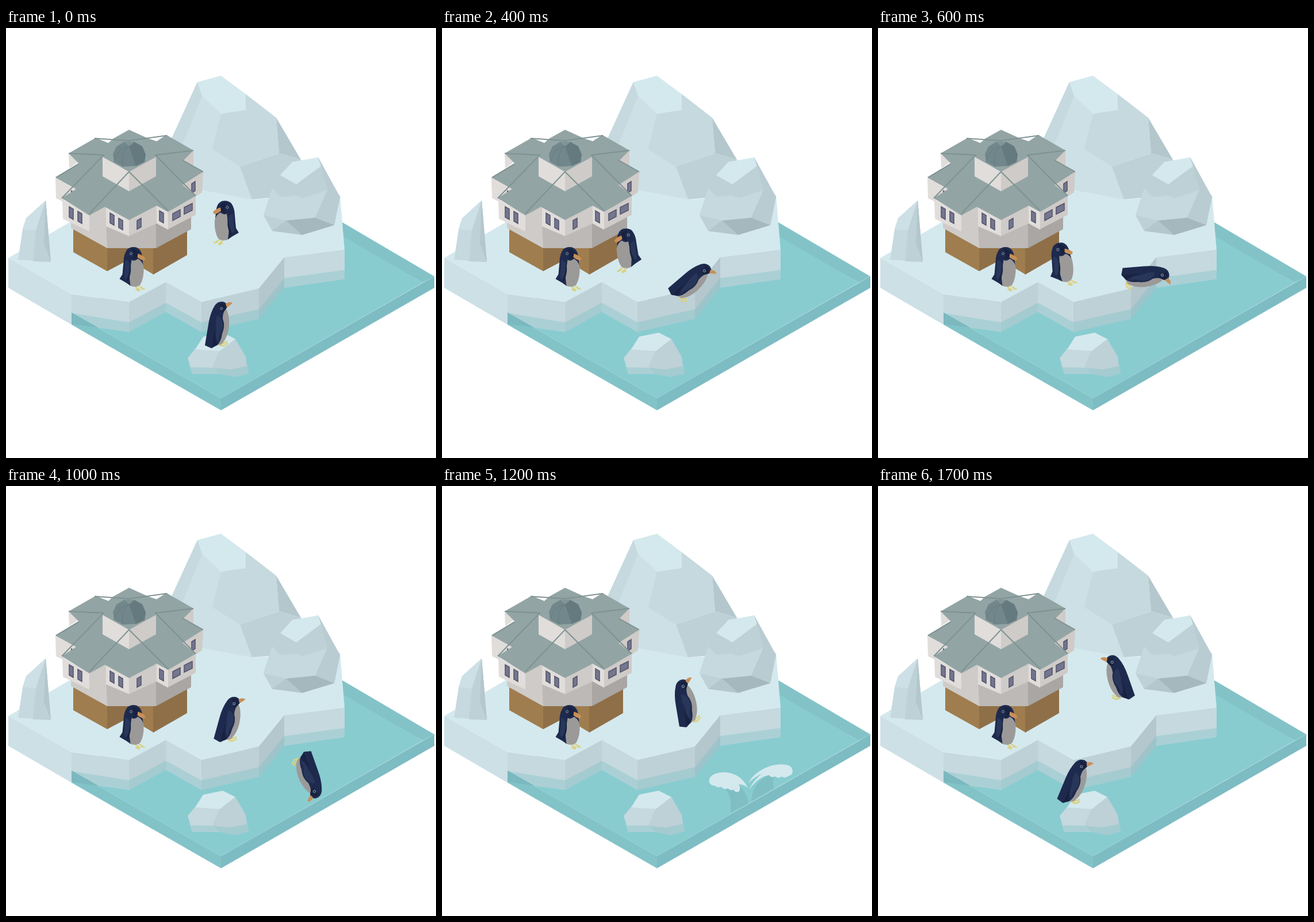
Animation, 748 px wide and 748 px high, one loop 1900 ms. Source, as an HTML page:

```html
<!DOCTYPE html>
<html lang="en">
<head>
<meta charset="utf-8">
<title>Polar island</title>
<style>
  html, body { margin: 0; width: 100%; height: 100%; overflow: hidden; background: #fff; }
  svg { display: block; width: 100vw; height: 100vh; }
  .ice1 { fill: #d4e9ee } .ice2 { fill: #cce0e6 } .ice3 { fill: #c5d9df }
  .ice4 { fill: #bed1d7 } .ice5 { fill: #b3c7cc } .ice6 { fill: #a5b8be }
  .wet1 { fill: #aad0d5 } .wet2 { fill: #a4cbd0 } .wet3 { fill: #9dc4ca }
  .wall { fill: #e0dddb } .shade { fill: #cfcbc8 } .roof { fill: #93a4a4 }
  .wood { fill: #9f7d4e } .dark { fill: #8f6f47 }
  .glass { fill: #74768f; stroke: #56576e; stroke-width: 1.6 }
  .seam { fill: none; stroke: #7f9292; stroke-width: 2 }
  .navy { fill: #1e2a4d } .wing { fill: #28365a } .deep { fill: #182240 }
  .belly { fill: #9b9a99 } .beak { fill: #c98f58 } .foot { fill: none; stroke: #d9d184; stroke-width: 2.6 }
  .eye { fill: #1e2a4d; stroke: #8795a0 }
</style>
</head>
<body>
<svg viewBox="0 0 748 748">
  <defs>
    <g id="front">
      <path class="foot" d="M4 29L14 37M10 28L21 35M6 35L13 38M15 33L22 35"/>
      <path class="navy" d="M-9-34Q-3-40 7-38Q15-35 17-25L19-8L13 26L-3 29L-10 24L-22 17L-17 9L-15-13Q-15-25-9-34Z"/>
      <path class="belly" d="M-1-16Q4-13 10-18Q17-15 20-5Q21 15 14 27Q7 33-3 29L-5 12Z"/>
      <path class="wing" d="M-12-16Q-5-15-4-7Q-2 5-9 19L-14 15Z"/>
      <path class="deep" d="M-4-12Q1 4-8 22L-10 18Q-3 5-4-12ZM-2-36Q9-36 12-27L8-19L0-17Q6-26-2-36Z"/>
      <path class="beak" d="M10-27Q19-24 23-19L21-15Q14-16 9-21Z"/>
      <circle class="eye" cx="-2" cy="-27" r="2"/>
    </g>
    <g id="side">
      <path class="foot" d="M4 35L16 29M2 36L10 37L17 32"/>
      <path class="belly" d="M13-29Q20-18 19-1Q18 22 6 34L-2 36L-1-10Z"/>
      <path class="navy" d="M-6-33Q-1-41 8-40Q16-38 16-31L11-24Q8-19 8-10Q13 2 7 16Q5 30-2 36L-12 41L-23 36L-17 0Q-14-20-6-33Z"/>
      <path class="wing" d="M-2-16Q7-13 8-1Q9 7 3 16Q0 23 1 31Q-6 24-3 9Q-6-3-2-16Z"/>
      <path class="deep" d="M0-36Q11-39 16-31L11-24L4-21Q8-30 0-36ZM-6 9Q-5 25-2 34L-11 41Z"/>
      <path class="beak" d="M13-36Q18-41 25-38Q22-34 15-30Z"/>
      <circle class="eye" cx="6" cy="-28" r="2"/>
    </g>
    <g id="plumes">
      <path fill="#7fbfc4" d="M480 514C501 529 504 546 502 569L533 552C531 536 525 526 512 520ZM538 549C539 524 552 509 575 500L581 503C571 517 578 522 578 526Z"/>
      <path class="ice1" d="M532 525C520 499 491 493 472 502C461 508 463 521 474 521Q479 526 485 523Q491 529 497 526Q503 531 507 528Q511 535 517 531Q520 525 516 519Q524 518 532 525ZM533 517C544 494 579 479 603 486C612 490 612 503 603 504Q596 510 591 505Q585 510 580 505Q574 509 569 503Q553 504 534 528Q542 512 557 500Q543 506 533 517Z"/>
    </g>
  </defs>

  <!-- water -->
  <path fill="#83c3c8" d="M585 338L745 432L725 443L580 361Z"/>
  <path fill="#88ccd0" d="M587 363L725 443L374 644L114 495L300 400Z"/>
  <path fill="#7dbcc3" d="M745 432V452L374 665V644Z"/>

  <!-- mountain -->
  <path class="ice2" d="M333 94L374 149L410 240L428 298L340 310L270 232Z"/>
  <path class="ice3" d="M333 94L341 118L306 205L289 190ZM374 149L417 141V115L470 156L475 218L407 241L359 211Z"/>
  <path class="ice5" d="M470 156L513 229L475 218Z"/>

  <!-- island -->
  <path class="ice1" d="M4 400L114 336L330 280L428 298L581 290L589 386L484 400L440 454L340 477L278 443L214 477L114 463Z"/>
  <path class="ice4" d="M407 241L475 218L513 229L530 290L428 298Z"/>
  <path class="ice2" d="M4 400L114 463V516L4 452Z"/>
  <path class="wet1" d="M114 495L214 511V529L114 515ZM278 477L340 511V529L278 494ZM484 434L589 420V437L484 452Z"/>
  <path class="wet2" d="M214 511L278 477V494L214 529ZM340 511L440 488V506L340 529Z"/>
  <path class="wet3" d="M440 488L484 434V452L440 506Z"/>
  <path class="ice3" d="M114 463L214 477V512L114 496ZM278 442L340 477V512L278 478ZM484 399L589 386V421L484 435Z"/>
  <path class="ice4" d="M214 477L278 442V478L214 512ZM340 477L440 453V489L340 512Z"/>
  <path class="ice5" d="M440 453L484 399V435L440 489Z"/>
  <path fill="#82c3c8" d="M114 495L374 644V665L114 516Z"/>
  <path fill="#7bb8bf" d="M114 495L160 521L114 515Z"/>

  <!-- peak, boulder, spire and floe -->
  <path class="ice1" d="M333 94L374 83L417 115V143L374 149L341 118Z"/>
  <path class="ice4" d="M477 256L543 225L581 294L571 343L515 360L463 353L448 326L463 279Z"/>
  <path class="ice3" d="M463 279L477 294L505 291L516 296L559 282L538 330L487 335L448 326Z"/>
  <path class="ice1" d="M477 256L498 233L543 225L548 240L505 272Z"/>
  <path fill="#b9ccd2" d="M543 225L581 294L571 343L538 330L559 282L548 240Z"/>
  <path class="ice6" d="M487 335L538 330L571 343L515 360Z"/>
  <path class="ice5" d="M463 353L487 335L515 360Z"/>
  <path class="ice3" d="M69 300L78 407L21 403L29 350L35 331Z"/>
  <path class="ice2" d="M69 300L52 352L29 350L35 331Z"/>
  <path class="ice4" d="M69 300L78 407L47 406L52 352Z"/>
  <path class="ice5" d="M69 300L78 407L66 375Z"/>
  <path class="wet1" d="M319 587L420 586L422 601L398 607L372 602L324 602Z"/>
  <path class="wet2" d="M359 590L420 586L422 601L398 607L372 602Z"/>
  <path class="ice3" d="M330 557L372 562L359 591L321 590L316 574Z"/>
  <path class="ice4" d="M399 541L417 572L419 588L390 594L359 591L372 562Z"/>
  <path class="ice1" d="M343 537L377 530L399 541L372 562L329 559Z"/>

  <!-- station -->
  <path class="wood" d="M117 348L176 381V423L117 390ZM214 381H257V429L214 403Z"/>
  <path class="dark" d="M176 381H214V403L176 423ZM256 381L315 348V395L256 429Z"/>
  <path class="shade" d="M113 325L176 335V383L113 348Z"/>
  <path fill="#bcb9b7" d="M174 335H261V383H176Z"/>
  <path fill="#a9a6a4" d="M261 335L322 322V350L261 383Z"/>
  <path class="wall" d="M109 218L130 230L110 244ZM86 260L125 280L99 302L87 296ZM98 298L145 325V354L99 332ZM172 309L214 333V362L174 345ZM262 308L282 320V351L262 340Z"/>
  <path class="shade" d="M326 213V240L308 230ZM343 250L341 286L330 293L300 270ZM145 325L174 309V345L145 354ZM214 333L262 308V340L214 362ZM282 320L330 292V325L282 350Z"/>
  <path class="glass" d="M110 311L117 315V333L110 329ZM125 319L132 323V340L125 336ZM181 322L188 326V343L181 339ZM196 331L203 335V351L196 347ZM267 318L274 322V339L267 335ZM228 335L235 331V346L228 350ZM290 323L303 316V328L290 335ZM310 312L324 305V317L310 324ZM323 271L329 267V283L323 287Z"/>
  <path fill="#56576e" d="M113 282L118 285L113 290Z"/>
  <path class="roof" d="M156 191L178 200L187 192L214 177L247 192L262 197L279 186L326 213L309 230L343 250L307 273L330 292L282 320L262 309L214 334L172 311L145 326L97 296L122 280L86 260L126 235L109 218Z"/>
  <path class="wall" d="M168 224L214 250V284L168 258Z"/>
  <path class="shade" d="M214 250L261 224V258L214 284Z"/>
  <path class="seam" d="M154 192L214 196L280 187M109 218L170 221L97 296M326 213L260 221L330 292M145 323L214 250L282 318M87 260L126 237M343 250L307 230"/>
  <path class="roof" d="M168 224L214 197L261 224L214 250Z"/>
  <path fill="#72878b" d="M186 219L192 206L206 198H223L237 206L243 220L241 233L226 240L203 241L188 233Z"/>
  <path fill="#647a7f" d="M214 206L223 198L237 206L243 220L241 233L226 240Z"/>
  <path fill="#809597" d="M206 199L214 197L223 199L214 206Z"/>
  <path fill="none" stroke="#667c80" d="M214 206Q199 215 203 241M214 206Q195 208 188 233M214 206Q230 215 226 240M214 206Q237 212 241 233"/>

  <use href="#front" transform="translate(219.5 419.5)"/>
  <use id="walker"/>
  <use id="splash" href="#plumes"/>
  <use id="diver" href="#side"/>
</svg>
<script>
  const LOOP = 1900;
  const starts = [0, 200, 400, 600, 800, 1000, 1200, 1500, 1700];

  // x, y, tilt; null while under water
  const dives = [
    [369, 516, 0], [388, 472, 3], [434, 440, 40], [466, 431, 76], [511, 460, 113],
    [528, 504, 151], null, null, [342, 514, 13]
  ];
  // view, x, y, tilt, facing
  const walks = [
    ['front', 383, 339, 0, -1], ['front', 350, 359, 11, -1], ['front', 324, 387, -4, -1],
    ['front', 319, 412, -9, 1], ['front', 354, 416, 6, 1], ['side', 388, 406, 6, 1],
    ['side', 423, 377, -19, 1], ['side', 430, 350, 4, -1], ['side', 418, 333, -10, -1]
  ];
  const splashes = { 6: 1, 7: 0.55 };

  const [walker, diver, splash] = ['walker', 'diver', 'splash'].map(id => document.getElementById(id));

  function show(node, transform) {
    node.style.display = transform ? '' : 'none';
    if (transform) node.setAttribute('transform', transform);
  }
  const place = (x, y, tilt, facing = 1) =>
    `translate(${x} ${y}) rotate(${tilt}) scale(${facing} 1)`;

  function draw() {
    const time = performance.now() % LOOP;
    const step = starts.findLastIndex(start => time >= start);
    const [view, ...pose] = walks[step];
    const size = splashes[step];
    walker.setAttribute('href', '#' + view);
    show(walker, place(...pose));
    show(diver, dives[step] && place(...dives[step]));
    show(splash, size && `translate(535 550) scale(${size}) translate(-535 -550)`);
    requestAnimationFrame(draw);
  }
  draw();
</script>
</body>
</html>
```
